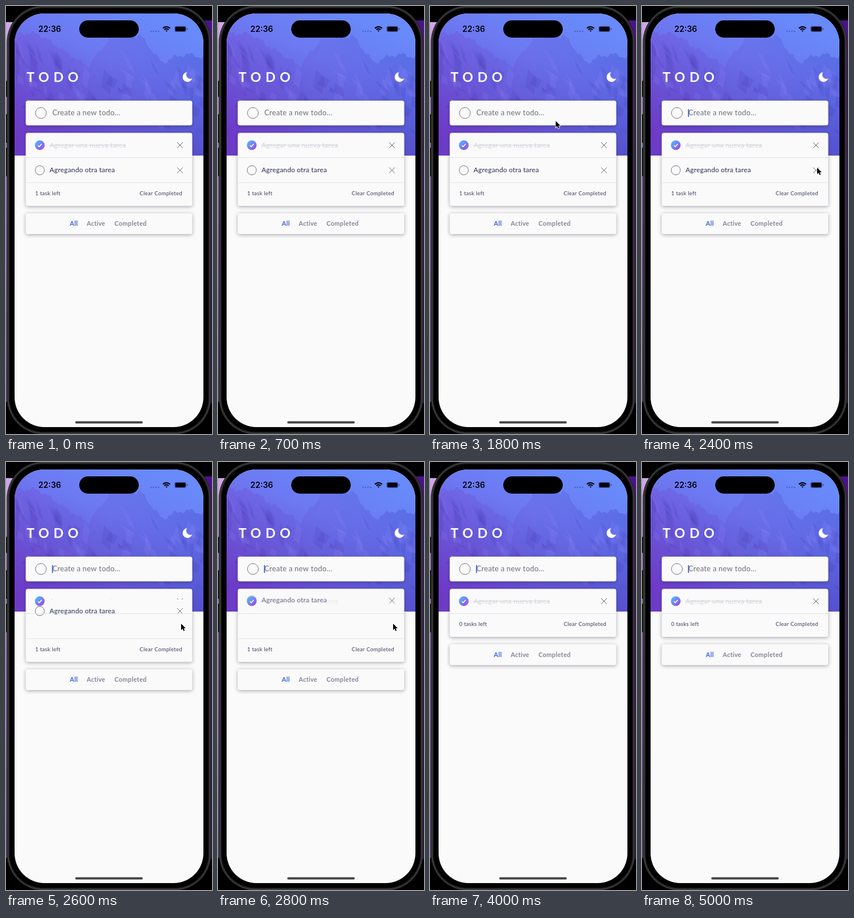
Animation of 360 by 744 pixels, one loop 5500 ms. Source, as an HTML page with a canvas:

```html
<!DOCTYPE html>
<html lang="es">
<head>
<meta charset="utf-8">
<title>Todo</title>
<style>
html, body { margin: 0; width: 100%; height: 100%; overflow: hidden; background: #000; }
canvas { display: block; width: 360px; height: 744px; }
</style>
</head>
<body>
<canvas id="stage"></canvas>
<script>
const W = 360, H = 744, LOOP = 5500;
const PAPER = '#fafafa', INK = '#494c6b', MUTED = '#85869a', BLACK = '#05050d';
const CARD = { x: 34.5, w: 291 }, ROW = 43.5, ROW_MID = 242;
const canvas = document.getElementById('stage');
const ctx = canvas.getContext('2d');
const ratio = window.devicePixelRatio || 1;
canvas.width = W * ratio;
canvas.height = H * ratio;

const clamp = v => Math.max(0, Math.min(1, v));
const span = (t, from, to) => clamp((t - from) / (to - from));
const easeOut = p => 1 - (1 - p) ** 3;
const easeInOut = p => p * p * (3 - 2 * p);

function random(seed) {
  return () => (seed = seed * 16807 % 2147483647) / 2147483647;
}

function gradient(x0, y0, x1, y1, ...colors) {
  const g = ctx.createLinearGradient(x0, y0, x1, y1);
  colors.forEach((c, i) => g.addColorStop(i / (colors.length - 1), c));
  return g;
}

function box(x, y, w, h, r, fill) {
  ctx.beginPath();
  ctx.roundRect(x, y, w, h, r);
  ctx.fillStyle = fill;
  ctx.fill();
}

function circle(x, y, r) {
  ctx.beginPath();
  ctx.arc(x, y, r, 0, Math.PI * 2);
}

function disc(x, y, r, fill) {
  circle(x, y, r);
  ctx.fillStyle = fill;
  ctx.fill();
}

function ring(x, y, r) {
  circle(x, y, r);
  ctx.lineWidth = 1;
  ctx.strokeStyle = '#74757f';
  ctx.stroke();
}

function trace(points) {
  ctx.beginPath();
  points.forEach(([x, y]) => ctx.lineTo(x, y));
}

function shape(points, fill) {
  trace(points);
  ctx.fillStyle = fill;
  ctx.fill();
}

function line(points, color, width = 1) {
  trace(points);
  ctx.strokeStyle = color;
  ctx.lineWidth = width;
  ctx.stroke();
}

function label(text, x, y, size, weight, color, spacing = 0, family = 'Lato') {
  ctx.font = `${weight} ${size}px ${family}, sans-serif`;
  ctx.letterSpacing = spacing + 'px';
  ctx.fillStyle = color;
  ctx.fillText(text, x, y);
  return ctx.measureText(text).width;
}

function card(y, h) {
  ctx.save();
  ctx.shadowColor = 'rgba(30, 30, 50, 0.38)';
  ctx.shadowBlur = 6 * ratio;
  ctx.shadowOffsetY = 1.5 * ratio;
  box(CARD.x, y, CARD.w, h, 4, PAPER);
  ctx.restore();
}

function divider(y) {
  line([[CARD.x, y], [CARD.x + CARD.w, y]], '#e1e2ec');
}

function drawBody() {
  ctx.fillStyle = '#000';
  ctx.fillRect(0, 0, W, H);
  box(0, 28, 30, 660, 0, gradient(0, 28, 0, 690, '#d0a6e8', '#8d5cc0', '#57447a'));
  box(330, 25, 30, 665, 0, gradient(0, 25, 0, 690, '#4b1289', '#2c1748'));
  for (let i = 0; i < 3; i++) box(0, 130 + i * 58, 4, i ? 50 : 28, 1, '#141414');
  box(1.5, -1, 357, 746, 64, '#222');
  box(3, 0.5, 354, 743, 62, '#454545');
  box(4.5, 2, 351, 740, 60, '#1c1c1c');
  box(6.5, 4, 347, 736, 58, '#000');
}

// Each peak is [x, y, half width of its flat top, slope].
const PEAKS = [[38, 48, 18, 0.65], [210, 52, 26, 1.3], [318, 85, 12, 0.4]];

function ridge(x) {
  const base = Math.min(...PEAKS.map(([px, py, flat, slope]) =>
    py + Math.max(0, Math.abs(x - px) - flat) * slope));
  return base + 3 * Math.sin(x * 0.23) + 2 * Math.sin(x * 0.61 + 1);
}

function drawHeader() {
  ctx.save();
  ctx.beginPath();
  ctx.rect(15, 13, 330, 247);
  ctx.clip();
  ctx.fillStyle = gradient(235, 13, 135, 260, '#688afa', '#6d79f2', '#655dd9', '#673bc6');
  ctx.fillRect(15, 13, 330, 247);

  const outline = [[345, 260], [15, 260]];
  for (let x = 15; x <= 345; x += 3) outline.push([x, ridge(x)]);
  trace(outline);
  ctx.clip();
  ctx.fillStyle = gradient(15, 0, 345, 0,
    'rgba(125, 60, 205, 0.26)', 'rgba(95, 75, 205, 0.2)', 'rgba(50, 60, 190, 0.3)');
  ctx.fillRect(15, 13, 330, 247);

  // Rock faces: leaning shards, longest near the ridge.
  const rand = random(17);
  for (let i = 0; i < 110; i++) {
    const x = 10 + rand() * 335, depth = rand();
    const y = ridge(x) + depth * 130;
    const w = 5 + rand() * 12, h = (16 + rand() * 34) * (1.2 - depth);
    const lean = (rand() - 0.3) * 24;
    shape([[x, y], [x + w, y + h * 0.4], [x + lean + w, y + h], [x + lean, y + h * 0.7]],
      i % 2 ? 'rgba(150, 140, 250, 0.14)' : 'rgba(50, 35, 150, 0.12)');
  }
  ctx.restore();
}

function drawStatus() {
  label('22:36', 56.5, 45, 14, 600, BLACK, 0, 'Inter');
  box(128, 25, 104, 30, 15, '#000');
  for (let i = 0; i < 4; i++) disc(253.5 + i * 4.4, 44, 1.3, 'rgba(35, 35, 110, 0.4)');
  ctx.strokeStyle = BLACK;
  ctx.lineWidth = 2.2;
  for (let r = 1.5; r < 10; r += 3.6) {
    ctx.beginPath();
    ctx.arc(280.5, 44.8, r, -Math.PI * 0.76, -Math.PI * 0.24);
    ctx.stroke();
  }
  box(294.5, 35, 20.5, 10, 3, 'rgba(15, 15, 50, 0.5)');
  box(296, 36.3, 17.5, 7.4, 2, BLACK);
  box(316, 38.3, 1.4, 3.6, 1, 'rgba(15, 15, 50, 0.5)');
}

function drawMoon() {
  ctx.save();
  ctx.beginPath();
  ctx.rect(300, 106, 40, 36);
  ctx.arc(322.3, 119.3, 7.4, 0, Math.PI * 2);
  ctx.clip('evenodd');
  disc(317.2, 123.4, 8.5, '#fff');
  ctx.restore();
}

function drawCheck() {
  disc(59, ROW_MID, 8.5, gradient(53, 236, 65, 248, '#55b0ff', '#6f83f4', '#a44bea'));
  line([[55.7, 242.2], [58, 244.5], [62.5, 239.8]], '#fff', 1.6);
}

function drawCross(y) {
  for (const s of [-5, 5]) line([[304 - s, y - 5], [304 + s, y + 5]], '#65677a');
}

function drawDoneRow() {
  const width = label('Agregar una nueva tarea', 76, ROW_MID + 3.5, 12, 400, '#d3d4dc', 0.25);
  line([[76, ROW_MID], [76 + width, ROW_MID]], '#d3d4dc');
  drawCross(ROW_MID);
}

function drawOpenRow(t) {
  const mid = ROW_MID + ROW - 45 * easeOut(span(t, 2550, 2750));
  ctx.save();
  ctx.globalAlpha = 1 - span(t, 2550, 3000) ** 2;
  if (t > 2550) box(36, mid - 20, 288, 41, 0, PAPER);
  ring(59, mid, 8);
  label('Agregando otra tarea', 76, mid + 3.5, 12, 600, INK, 0.1);
  drawCross(mid);
  ctx.restore();
}

function drawList(t) {
  const removed = t >= 3000;
  const lift = removed ? -ROW : 0;
  const footer = 328.5 + lift, filters = 382 + lift;
  card(220.6, 127 + lift);
  drawDoneRow();
  if (!removed) {
    drawOpenRow(t);
    divider(263.5 + ROW);
  }
  drawCheck();
  divider(263.5);
  label(removed ? '0 tasks left' : '1 task left', 51, footer, 9.5, 500, INK, 0.25);
  label('Clear Completed', 233.5, footer, 9.5, 500, INK, 0.3);

  card(360.3 + lift, 36.3);
  label('All', 111.5, filters, 11, 700, '#3a62dc', 0.3);
  label('Active', 141, filters, 11, 700, MUTED, 0.2);
  label('Completed', 189.5, filters, 11, 700, MUTED, 0.3);
}

// The blink restarts when the row is deleted, so the caret stays lit there.
function caretAlpha(t) {
  if (t < 1100) return 0;
  if (t > 2450 && t < 3500) return 1;
  const phase = t % 1000;
  return 1 - span(phase, 540, 660) + span(phase, 840, 960);
}

function drawInput(t) {
  card(164.6, 43);
  ring(61, 186, 9.5);
  label('Create a new todo...', 81, 190, 13, 500, '#777985', 0.2);
  ctx.globalAlpha = caretAlpha(t);
  box(80.4, 179, 1.8, 14, 0.9, '#3d62d8');
  ctx.globalAlpha = 1;
}

// The pointer is hidden while it rests over the text field.
function drawPointer(t) {
  const away = 1 - easeInOut(span(t, 1650, 2300)) + easeInOut(span(t, 3120, 3500));
  if (away > 0.9) return;
  ctx.save();
  ctx.translate(306 - 100 * away, 281 - 94 * away);
  trace([[0, 0], [0, 11.2], [2.6, 8.8], [4.4, 12.8], [6.3, 12], [4.6, 8.1], [8, 8]]);
  ctx.closePath();
  ctx.strokeStyle = '#fff';
  ctx.lineWidth = 1.6;
  ctx.stroke();
  ctx.fillStyle = '#000';
  ctx.fill();
  ctx.restore();
}

function draw(t) {
  ctx.setTransform(ratio, 0, 0, ratio, 0, 0);
  drawBody();
  ctx.save();
  ctx.beginPath();
  ctx.roundRect(15, 13, 330, 719, 52);
  ctx.clip();
  ctx.fillStyle = PAPER;
  ctx.fillRect(15, 13, 330, 719);
  drawHeader();
  drawStatus();
  label('TODO', 36, 131.5, 23, 700, '#fff', 7.6);
  drawMoon();
  drawInput(t);
  drawList(t);
  box(121, 721.8, 118, 4, 2, '#48484b');
  drawPointer(t);
  ctx.restore();
}

const start = performance.now();
function tick() {
  draw((performance.now() - start) % LOOP);
  requestAnimationFrame(tick);
}
tick();
</script>
</body>
</html>
```
